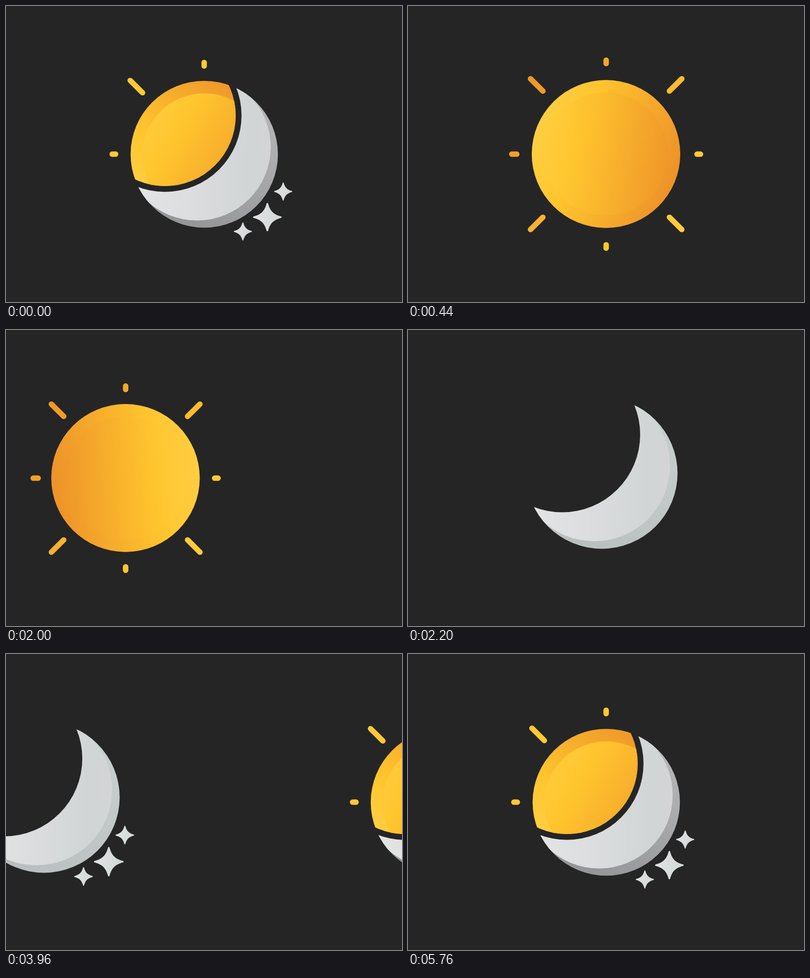
These frames come from a looping animation (800 px wide and 600 px high, 5.8 s). An HTML page with a canvas:

```html
<!DOCTYPE html>
<html lang="en">
<head>
<meta charset="utf-8">
<title>Sun and moon</title>
<style>
  html, body { margin: 0; width: 100%; height: 100%; overflow: hidden; background: #252525; }
  canvas { display: block; }
</style>
</head>
<body>
<canvas id="stage" width="800" height="600"></canvas>
<script>
const ctx = document.getElementById('stage').getContext('2d');
const BG = '#252525';
const LOOP = 5800, SCENE = 1920, SLIDE = 280;
const GOLD = ['#ffce41', '#ffc52e', '#ed9229'];

const smooth = x => { x = Math.min(1, Math.max(0, x)); return x * x * (3 - 2 * x); };

function gradient(x0, y0, x1, y1, stops) {
  const g = ctx.createLinearGradient(x0, y0, x1, y1);
  stops.forEach(([at, color]) => g.addColorStop(at, color));
  return g;
}
// light end at the first point
const gold = (x0, y0, x1, y1) =>
  gradient(x0, y0, x1, y1, [[0, GOLD[0]], [0.3, GOLD[1]], [1, GOLD[2]]]);

function circle(x, y, r) {
  ctx.beginPath();
  ctx.arc(x, y, r, 0, Math.PI * 2);
}
function disc(x, y, r, fill) {
  circle(x, y, r);
  ctx.fillStyle = fill;
  ctx.fill();
}

// Outer reach of the rays: cosine swings between a few extremes
const REACH = [[0, 192], [610, 197], [1215, 189.5], [1820, 194.3], [2425, 184]];
function reach(t) {
  let i = 0;
  while (i < REACH.length - 2 && t > REACH[i + 1][0]) i++;
  const [t0, a] = REACH[i], [t1, b] = REACH[i + 1];
  const p = Math.min(1, (t - t0) / (t1 - t0));
  return a + (b - a) * (1 - Math.cos(Math.PI * p)) / 2;
}

// Eighths of a turn, clockwise from the right
function rays(list, d, stroke, longLeft) {
  ctx.strokeStyle = stroke;
  ctx.lineWidth = 11;
  ctx.lineCap = 'round';
  for (const n of list) {
    const diagonal = n % 2;
    const far = diagonal ? d + 20 : d - 5.5;
    const near = diagonal ? d - 15.3 : d - (n === 4 && longLeft ? 15.5 : 12.5);
    const a = n * Math.PI / 4, c = Math.cos(a), s = Math.sin(a);
    ctx.beginPath();
    ctx.moveTo(400.3 + c * near, 300.3 + s * near);
    ctx.lineTo(400.3 + c * far, 300.3 + s * far);
    ctx.stroke();
  }
}

function star(x, y, r) {
  if (r < 0.2) return;
  ctx.save();
  ctx.translate(x, y);
  ctx.scale(r, r);
  ctx.beginPath();
  ctx.moveTo(0.05, -0.96);
  for (let i = 0; i < 4; i++) {
    ctx.bezierCurveTo(0.2, -0.42, 0.42, -0.2, 0.96, -0.05);
    ctx.quadraticCurveTo(1.04, 0, 0.96, 0.05);
    ctx.rotate(Math.PI / 2);
  }
  ctx.closePath();
  ctx.fillStyle = gradient(-1, 0, 1, 0, [[0, '#e1e2e3'], [1, '#d3d7d7']]);
  ctx.fill();
  ctx.restore();
}

// Grow past full size, then settle
function pop(t, start) {
  const p = (t - start) / 160;
  return p < 1 ? 1.32 * smooth(p) : 1.32 - 0.32 * smooth(p - 1);
}
function stars(t, list) {
  list.forEach(([x, y, r], i) => star(x, y, r * pop(t, 480 + i * 320)));
}

function moon(x, y, r, shade, depth, cut) {
  disc(x, y, r, shade);
  ctx.save();
  circle(x, y, r);
  ctx.clip();
  disc(x - depth, y - depth, r, gradient(x - r, 0, x + r, 0,
    [[0, '#e5e5e6'], [0.5, '#d9dbdc'], [0.8, '#d1d5d6'], [1, '#d3d4d5']]));
  ctx.restore();
  disc(...cut, BG);
}

function turningDisc(r, a) {
  const c = Math.cos(a) * r, s = Math.sin(a) * r;
  disc(400, 300, r, gold(400 + c, 300 + s, 400 - c, 300 - s));
}

function sunScene(t) {
  const turn = (90 + 0.0976 * (t - 1160)) * Math.PI / 180;
  turningDisc(150, Math.PI + turn);
  ctx.globalAlpha = 0.25;
  turningDisc(125, Math.PI - turn);
  ctx.globalAlpha = 1;
  rays([0, 1, 2, 3, 4, 5, 6, 7], reach(t), gold(595, 440, 205, 160), true);
}

function moonScene(t) {
  const shade = gradient(520, 180, 330, 440, [[0, '#c8cdcd'], [1, '#b9bfbe']]);
  moon(391.5, 290.5, 153, shade, 15.2, [311.5, 212, 157.5]);
  stars(t, [[522.5, 421, 30], [471.5, 451, 19], [555, 367, 19]]);
}

function bothScene(t) {
  const shade = gradient(530, 190, 400, 450, [[0, '#b6b8ba'], [1, '#959799']]);
  moon(400.5, 300.5, 148.8, shade, 14.5, [321, 222, 154.8]);
  ctx.save();
  circle(321, 222, 143);
  ctx.clip();
  disc(400.5, 300.5, 148.8, gold(250, 345, 440, 120));
  disc(400.5, 302, 125, gold(255, 215, 545, 385));
  ctx.restore();
  rays([4, 5, 6], reach(t) - 1.7, '#ffc835', false);
  stars(t, [[528, 428, 29], [478.5, 457, 18.5], [560, 376, 18.5]]);
}

const scenes = [sunScene, moonScene, bothScene];

function show(scene, t, x) {
  ctx.save();
  ctx.translate(x, 0);
  scene(t);
  ctx.restore();
}

function draw(t) {
  ctx.fillStyle = BG;
  ctx.fillRect(0, 0, 800, 600);
  const n = Math.min(2, Math.floor(t / SCENE));
  const local = t - n * SCENE;
  const shift = 800 * smooth(local / SLIDE);
  if (shift < 800) {
    const length = n === 0 ? LOOP - 2 * SCENE : SCENE;
    show(scenes[(n + 2) % 3], local + length, -shift);
  }
  if (shift > 0) show(scenes[n], local, 800 - shift);
}

let begin = null;
function tick(now) {
  if (begin === null) begin = now;
  draw((now - begin) % LOOP);
  requestAnimationFrame(tick);
}
draw(0);
requestAnimationFrame(tick);
</script>
</body>
</html>
```
